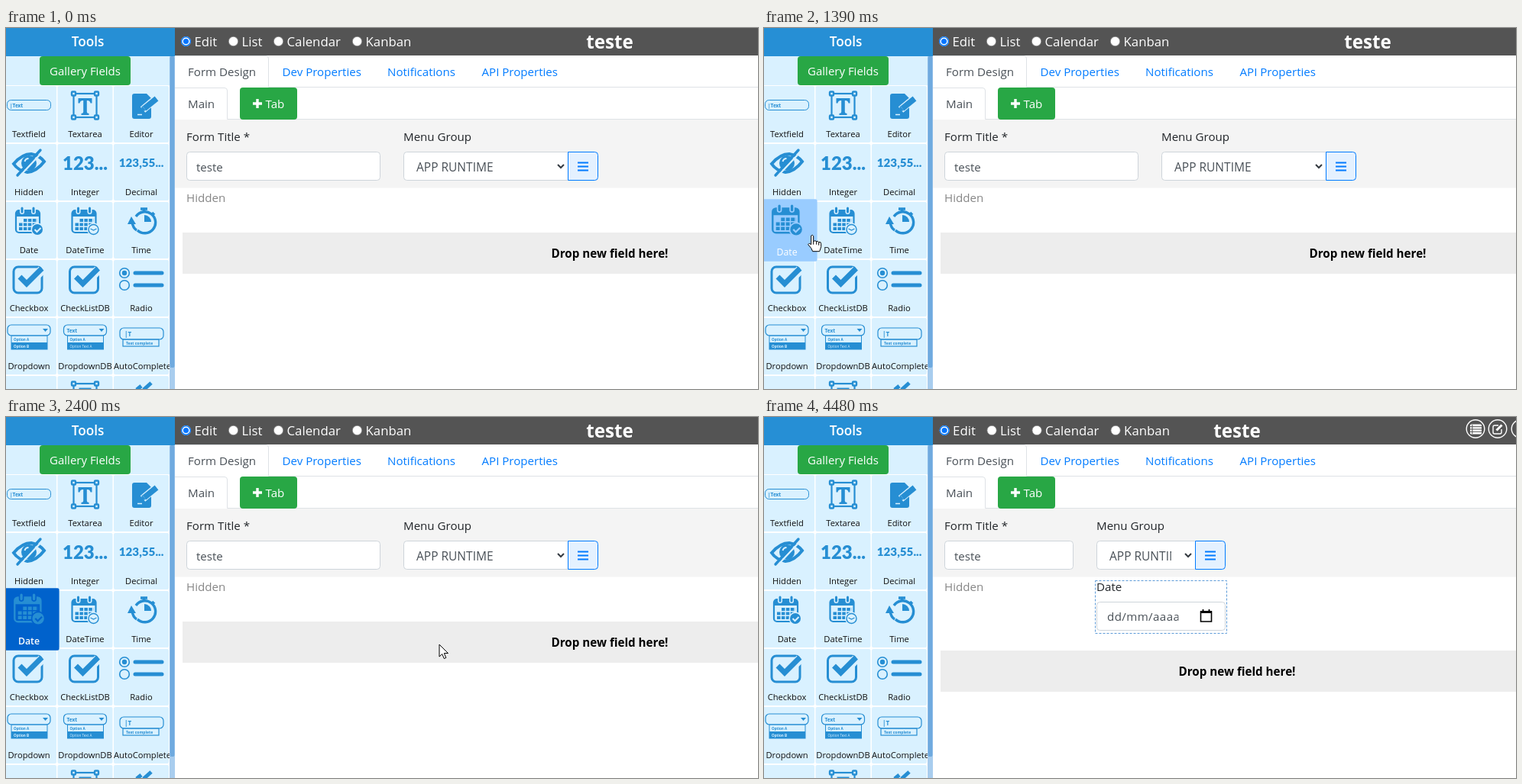
An HTML page that plays this animation: 984x473 px, repeating every 4.55 s.

```html
<!DOCTYPE html>
<html lang="en">
<head>
<meta charset="utf-8">
<title>Form designer</title>
<style>
html, body { margin: 0; width: 100%; height: 100%; overflow: hidden; background: #fff; }
svg { display: block; width: 100vw; height: 100vh; }
text { font-family: "Open Sans", "Noto Sans", sans-serif; white-space: pre; }
.tile { --bg: #d9f1ff; --label: #111; }
.hover { --bg: #99ccff; --label: #fff; }
.active { --bg: #0062cc; --label: #fff; --weight: 600; }
.bg { fill: var(--bg); }
.label { fill: var(--label); font-weight: var(--weight, 400); }
.ink { fill: #268ed3; }
.line { fill: none; stroke: #268ed3; }
.cut { fill: none; stroke: var(--bg); }
</style>
</head>
<body>
<svg id="stage" viewBox="0 0 984 473" preserveAspectRatio="none"></svg>
<script>
const LOOP = 4550;
const stage = document.getElementById('stage');

const text = (x, y, s, size = 15.1, attrs = '') =>
  `<text x="${x}" y="${y}" font-size="${size}" ${attrs}>${s}</text>`;
const rect = (x, y, w, h, attrs = '') =>
  `<rect x="${x}" y="${y}" width="${w}" height="${h}" ${attrs}/>`;
const circle = (x, y, r, attrs = '') => `<circle cx="${x}" cy="${y}" r="${r}" ${attrs}/>`;
const path = (d, attrs = '') => `<path d="${d}" ${attrs}/>`;
const middle = 'text-anchor="middle"';
const line = w => `class="line" stroke-width="${w}"`;
const cut = w => `class="cut" stroke-width="${w}"`;
const ink = 'class="ink"';

// Tile icons: x is measured from the tile's centre, y from its top.
const tiny = (x, y, s, size = 7) => text(x, y, s, size, ink + ' font-weight="700"');

const digits = (s, y, size) =>
  `<text y="${y}" font-size="${size}" ${middle} ${ink} style="font-family:Lato,sans-serif;font-weight:900">${s}</text>`;

const nodes = y => [[-15, y], [15, y], [-15, y + 31], [15, y + 31]]
  .map(([x, v]) => rect(x - 2.5, v - 2.5, 5, 5, 'rx="1" class="bg" stroke="#268ed3" stroke-width="2.4"')).join('');

const frame = y => rect(-15, y, 30, 31, line(2.2)) + nodes(y);

const calendar = badge =>
  rect(-17, 11, 31, 29, 'rx="4" ' + line(2.2)) +
  path('M-17 19V14Q-17 11-14 11H11Q14 11 14 14V19Z', ink) +
  path('M-9 8v5M6 8v5', cut(6) + ' stroke-linecap="round"') +
  path('M-9 8v5M6 8v5', line(3) + ' stroke-linecap="round"') +
  path('M-7 24h18M-13 29.500h24M-13 35h17', line(4) + ' stroke-dasharray="4.5 1.4"') +
  circle(11, 36, 8.5, 'class="bg"') + badge;

const checkbox =
  rect(-20, 9, 37, 34, 'rx="6" ' + line(3)) +
  path('M-11 22L-2 32L17 13', cut(12)) +
  path('M-12 22L-3 31L17 11', line(7));

const dropdown = first =>
  rect(-28, 9, 56, 14, 'rx="5" ' + line(1.2)) + first +
  path('M18 14h7l-3.500 4z', ink) +
  rect(-23, 23, 47, 18, line(1)) + rect(-23, 32, 47, 9, ink) +
  tiny(-20, 30, 'Option A', 4.6);

const icons = {
  Textfield: rect(-28.5, 18.5, 57, 13, 'rx="5" ' + line(1)) + tiny(-25, 28, '|Text', 6.5),
  Textarea: frame(10) +
    path('M-9 16H9V22.500H7Q6.500 19 3 19H2.300V34Q2.300 36 5 36V38H-5V36Q-2.300 36-2.300 34V19H-3Q-6.500 19-7 22.500H-9Z', ink),
  Editor: path('M-12 13Q-12 10-9 10H7L13 16V40Q13 43 10 43H-9Q-12 43-12 40Z', ink) +
    path('M2 31L20 16', cut(10)) + path('M4 29.500L20 16.500', line(7.5)) +
    path('M-1 34l2-8 5 6z', ink) + path('M-5 37.500h6', cut(1.5)),
  Hidden: path('M-20 26Q-9 13 3 13Q14 15 20 23Q10 36-2 37Q-14 35-20 26Z', line(4)) +
    circle(0, 25, 10, ink) + path('M-5.500 23q1-4 5-4', cut(2)) +
    path('M-13 43L18 10', cut(2.4)) + path('M-15 41L15 8', line(3.4) + ' stroke-linecap="round"'),
  Integer: digits('123...', 34, 24),
  Decimal: digits('123,55...', 30, 15.2),
  Date: calendar(circle(11, 36, 7, ink) + path('M7.500 36l3 3 5-5', cut(2))),
  DateTime: calendar(circle(11, 36, 6.5, line(1.4)) + path('M7 35l4 2 4-2', line(1.3))),
  Time: path('M-7 19A14 14 0 1 1-5 37', line(3.4)) +
    path('M-1 9h9M3.500 9v5M14 14l3 3', line(3.6)) +
    path('M4 26V17A9 9 0 0 1 13 26Z', ink) +
    path('M-12 26Q-11 34-6 37', line(3.4)) + path('M-18 29l5-10 6 10z', ink),
  Checkbox: checkbox,
  CheckListDB: checkbox,
  Radio: circle(-22, 17, 6.3, line(1.6)) + circle(-22, 17, 3.2, ink) + circle(-22, 33, 6.3, line(1.6)) +
    path('M-8 17h35M-8 33h35', line(5) + ' stroke-linecap="round"'),
  Dropdown: dropdown('') + text(-20, 38.5, 'Option B', 4.6, 'class="bg" font-weight="700"'),
  DropdownDB: dropdown(tiny(-24, 18.5, 'Text', 6.5)) + text(-20, 38.5, 'Option Text A', 4.6, 'class="bg"'),
  AutoComplete: rect(-28, 13, 57, 15, 'rx="5" ' + line(1.2)) + tiny(-22, 24, '|T', 8) +
    rect(-24, 28, 47, 9, line(1.2)) + tiny(-20, 34.5, 'Text complete', 5),
  ' ': '',
  '  ': frame(10) + path('M-8 17h16', line(3)),
  '   ': path('M3 18L13 9M-6 18l6-5', line(5))
};
const names = Object.keys(icons);
// Labels too long for the tile start at its left edge and overflow.
const tileLabel = name => name.length > 11
  ? text(-36, 67, name, 11.2, 'class="label"')
  : text(0, 67, name, 11.2, `class="label" ${middle}`);
const tileBody = name => rect(-36, 0, 72, 74, 'rx="2" class="bg"') + icons[name] + tileLabel(name);
const tilePlace = (i, scale = 1) => {
  const x = 30 + 73.5 * (i % 3), y = 76 + 76 * Math.floor(i / 3);
  return `translate(${x} ${y + 37}) scale(${scale}) translate(0 -37)`;
};

const sidebar =
  rect(0, 0, 221, 473, 'fill="#d9f1ff"') +
  rect(0, 75, 215, 398, 'fill="#fff"') +
  rect(214, 37, 7, 436, 'fill="#a9cdee"') + rect(214.5, 37, 6, 408, 'rx="2" fill="#6faadf"') +
  rect(0, 0, 221, 37, 'fill="#268fd5"') +
  text(107, 24, 'Tools', 17.2, `${middle} font-weight="600" fill="#fff"`) +
  rect(44, 37, 119, 38, 'rx="4" fill="#28a745"') +
  text(103.5, 62, 'Gallery Fields', 15, `${middle} fill="#fff"`) +
  `<clipPath id="gridClip">${rect(0, 76, 214, 397)}</clipPath><g clip-path="url(#gridClip)"><g id="grid">` +
  names.map((n, i) => `<g class="tile" transform="${tilePlace(i)}">${tileBody(n)}</g>`).join('') +
  '</g></g>';

const radio = (x, on) => on
  ? circle(x, 17.5, 6.5, 'fill="#fff"') + circle(x, 17.5, 5.8, 'fill="none" stroke="#0075ff" stroke-width="1.4"') +
    circle(x, 17.5, 3.6, 'fill="#0075ff"')
  : circle(x, 17.5, 6.2, 'fill="#fff" stroke="#767676" stroke-width=".8"');

const headerIcons = `<g fill="none" stroke="#fff" stroke-width="1.4">` +
  [931, 960, 990].map(x => circle(x, 15.5, 11.8)).join('') +
  rect(924, 9.5, 15, 13, 'rx="1.5" fill="#fff" stroke="none"') +
  path('M924 12.700h15m-15 3.300h15m-15 3.300h15M926.800 10v12', 'stroke="#545454" stroke-width="1"') +
  path('M961 11h-5q-2 0-2 2v7q0 2 2 2h7q2 0 2-2v-4') +
  path('M958.500 17.500l7-7', 'stroke-width="3"') + '</g>';

const box = (x, y, w, h, attrs = 'stroke="#ced4da"') =>
  rect(x + .5, y + .5, w - 1, h - 1, `rx="4" fill="#fff" ${attrs}`);

const chrome =
  rect(221, 0, 763, 36, 'fill="#545454"') +
  rect(221, 120, 763, 89.5, 'fill="#f4f4f4"') +
  path('M221 36.500H340Q343.500 36.500 343.500 40V77.500H984M221 78.500H286Q289.500 78.500 289.500 82V119.500H984',
    'fill="none" stroke="#dee2e6"') +
  text(238, 63, 'Form Design', 15.1, 'fill="#495057"') +
  [[361.5, 'Dev Properties'], [499, 'Notifications'], [622.5, 'API Properties']]
    .map(([x, s]) => text(x, 63, s, 15.1, 'fill="#007bff"')).join('') +
  text(238, 105, 'Main', 15.1, 'fill="#495057"') +
  rect(306, 78, 75, 42, 'rx="4" fill="#28a745"') +
  path('M323 99h12M329 93v12', 'stroke="#fff" stroke-width="3.4"') +
  text(339.5, 105, 'Tab', 15.1, 'fill="#fff"') +
  text(236, 148, 'Form Title *', 15.1, 'fill="#212529"') +
  text(236, 228, 'Hidden', 15.1, 'fill="#868686"');

// Everything whose place depends on the width of the form's columns.
function scene(id, { shift, center, inputWidth, menuX, selectWidth, dropY, extra }) {
  const end = menuX + selectWidth;
  return `<g id="${id}">` +
    [['Edit', 235.5], ['List', 297.5], ['Calendar', 356.5], ['Kanban', 459.5]].map(([s, x], i) =>
      radio(x + shift, i === 0) + text(x + 11 + shift, 24, s, 16.8, 'fill="#fff"')).join('') +
    text(center, 27, 'teste', 24.2, `${middle} font-weight="700" fill="#fff"`) +
    box(236, 162, inputWidth, 38) + text(249, 188, 'teste', 15.1, 'fill="#495057"') +
    text(menuX, 148, 'Menu Group', 15.1, 'fill="#212529"') +
    box(menuX, 162, selectWidth + 4, 38) +
    `<clipPath id="${id}Clip">${rect(menuX, 162, selectWidth - 31, 38)}</clipPath>` +
    text(menuX + 17, 188, 'APP RUNTIME', 15.5, `fill="#495057" clip-path="url(#${id}Clip)"`) +
    path(`M${end - 13} 179l4 4 4-4`, 'fill="none" stroke="#343a40" stroke-width="2"') +
    path(`M${end + .5} 162.500h35q4 0 4 4v29q0 4-4 4h-35z`, 'fill="#e4f1ff" stroke="#007bff"') +
    path(`M${end + 13} 176.500h14m-14 5h14m-14 5h14`, 'stroke="#007bff" stroke-width="2.2"') +
    rect(231, dropY, 753, 54, 'fill="#ededed"') +
    text(center, dropY + 33, 'Drop new field here!', 15.2, `${middle} font-weight="700"`) +
    extra + '</g>';
}

const dateInput = y =>
  box(435, y, 169, 38) +
  `<clipPath id="date${y}">${rect(436, y, 106.5, 38)}</clipPath>` +
  text(449, y + 25, 'dd/mm/aaaa', 15.1, `fill="#495057" letter-spacing=".4" clip-path="url(#date${y})"`) +
  path(`M571.500 ${y + 13}h14v13h-14z`, 'fill="none" stroke="#000" stroke-width="1.6"') +
  path(`M571 ${y + 13.5}h15`, 'stroke="#000" stroke-width="3"') +
  path(`M574.500 ${y + 10}v3m8-3v3`, 'stroke="#000" stroke-width="1.8"');

const outline = (y, h, color) =>
  rect(433.5, y + .5, 172, h - 1, `fill="none" stroke="${color}" stroke-dasharray="3 2"`);

const narrow = { shift: .6, center: 619, inputWidth: 169, menuX: 435, selectWidth: 129 };

const labelEditor = outline(214, 106, '#7c8ba0') + dateInput(278) +
  `<g id="idle">${box(435, 210, 169, 62, 'stroke="#000" stroke-dasharray="3 2"')}</g>` +
  `<g id="focus">${rect(433.5, 208.500, 172, 65, 'rx="5" fill="none" stroke="#bfdeff" stroke-width="3"')}` +
  box(435, 210, 169, 62, 'stroke="#5b9fe8" stroke-dasharray="3 2"') +
  path('M483.500 219v20', 'stroke="#000"') + '</g>' +
  text(448, 235, 'Date', 15.1, 'font-weight="700" fill="#495057"') +
  path('M594 270l8-8m-4 8l4-4', 'stroke="#555"');

const scenes = {
  before: scene('before', { shift: 0, center: 790, inputWidth: 254, menuX: 520, selectWidth: 215, dropY: 268, extra: '' }),
  editing: scene('editing', { ...narrow, dropY: 342, extra: headerIcons + labelEditor }),
  after: scene('after', { ...narrow, dropY: 306, extra: headerIcons + outline(214, 70, '#5d9bd8') +
    text(435, 228, 'Date', 15.1, 'fill="#212529"') + dateInput(242) })
};

const arrow = path('M0 0V16L3.700 12.500L6.300 18.500L8.800 17.400L6.300 11.500H11.500Z', 'fill="#fff" stroke="#000"');
const cursors = {
  hand: path('M1 1.500Q3-.5 4 2V9Q6 7 8 9Q10 8 11 10Q14 9 14 12V16Q13 19 12 22H3Q2 18-3 13Q-2 10 1 13Z',
    'fill="#fff" stroke="#000" stroke-linejoin="round"') + path('M4 9v4m4-4v4m3-3v4', 'stroke="#000"'),
  deny: circle(0, 0, 7.500, 'fill="none" stroke="#fff" stroke-width="5"') +
    circle(0, 0, 7.500, 'fill="none" stroke="#222" stroke-width="2.5"') +
    path('M-5-5L5 5', 'stroke="#222" stroke-width="2.5"'),
  copy: path('M5 16h8m-7 2h8m-7 2h8m-7 2h8', 'stroke="#222" stroke-width="1.5" stroke-dasharray="1.5 1.5"') +
    arrow + rect(10.5, 20.5, 10, 10, 'fill="#fff" stroke="#000"') +
    path('M12.500 25.500h6m-3-3v6', 'stroke="#000"'),
  arrow
};

stage.innerHTML = rect(0, 0, 984, 473, 'fill="#fff"') + chrome + Object.values(scenes).join('') + sidebar +
  `<g id="ghost" class="tile active" opacity=".72">${tileBody('Date')}</g>` +
  `<g id="pointer">${circle(-1, 0, 11, 'id="halo" fill="#e3e032" opacity=".62"')}` +
  Object.entries(cursors).map(([k, v]) => `<g id="${k}">${v}</g>`).join('') + '</g>';

const $ = id => document.getElementById(id);
const show = (id, on) => { $(id).style.display = on ? '' : 'none'; };
const grid = $('grid');
const tiles = [...grid.children];
const DATE = names.indexOf('Date');

// Key points: time, x, y.
const pointerKeys = [
  [210, 862, 460], [350, 600, 375], [550, 150, 235], [690, 45, 205], [800, 56, 195], [920, 92, 202],
  [1110, 104, 229], [1190, 84, 250], [1280, 60, 270], [1600, 62, 272], [1790, 190, 294],
  [2130, 517, 308], [2230, 552, 313], [2330, 567, 298], [2400, 567, 298], [2480, 567, 303],
  [2950, 567, 303], [3130, 715, 375], [3300, 862, 459]
];
const ghostKeys = [[1600, 36, 228], [1790, 150, 248], [2130, 491, 264.5], [2230, 526, 269], [2330, 541, 254]];

function along(keys, t) {
  const i = keys.findIndex(k => k[0] > t);
  if (i < 1) return (i === 0 ? keys[0] : keys[keys.length - 1]).slice(1);
  const a = keys[i - 1], b = keys[i], f = (t - a[0]) / (b[0] - a[0]);
  return [a[1] + (b[1] - a[1]) * f, a[2] + (b[2] - a[2]) * f];
}

function tileAt([x, y]) {
  if (x > 213 || y < 78 || y > 473) return -1;
  return Math.floor((x + 6.7) / 73.5) + 3 * Math.floor((y - 78) / 76);
}

function render(t) {
  const tip = along(pointerKeys, t);
  const pressed = t >= 1450 && t < 3010;
  const dragging = t >= 1600 && t < 2400;
  const raised = pressed ? DATE : t >= 210 && t < 1450 ? tileAt(tip) : -1;

  tiles.forEach((tile, i) => {
    const up = i === raised;
    tile.setAttribute('class', 'tile' + (up ? pressed ? ' active' : ' hover' : ''));
    tile.setAttribute('transform', tilePlace(i, up ? 1.1 : 1));
    if (up && grid.lastChild !== tile) grid.append(tile);
  });

  show('before', t < 2800);
  show('editing', t >= 2800 && t < 4480);
  show('after', t >= 4480);
  show('idle', t < 3010);
  show('focus', t >= 3010);

  show('ghost', dragging);
  $('ghost').setAttribute('transform', `translate(${along(ghostKeys, t)})`);

  const kind = dragging && t < 2330 ? (tip[0] < 231 ? 'deny' : 'copy')
    : t < 1600 && tip[0] < 214 ? 'hand' : 'arrow';
  show('pointer', t >= 210 && t < 3365);
  $('pointer').setAttribute('transform', `translate(${tip})`);
  Object.keys(cursors).forEach(k => show(k, k === kind));
  show('halo', t >= 1450 && t < 2400);
}

const start = performance.now();
function tick() {
  render((performance.now() - start) % LOOP);
  requestAnimationFrame(tick);
}
tick();
</script>
</body>
</html>
```
